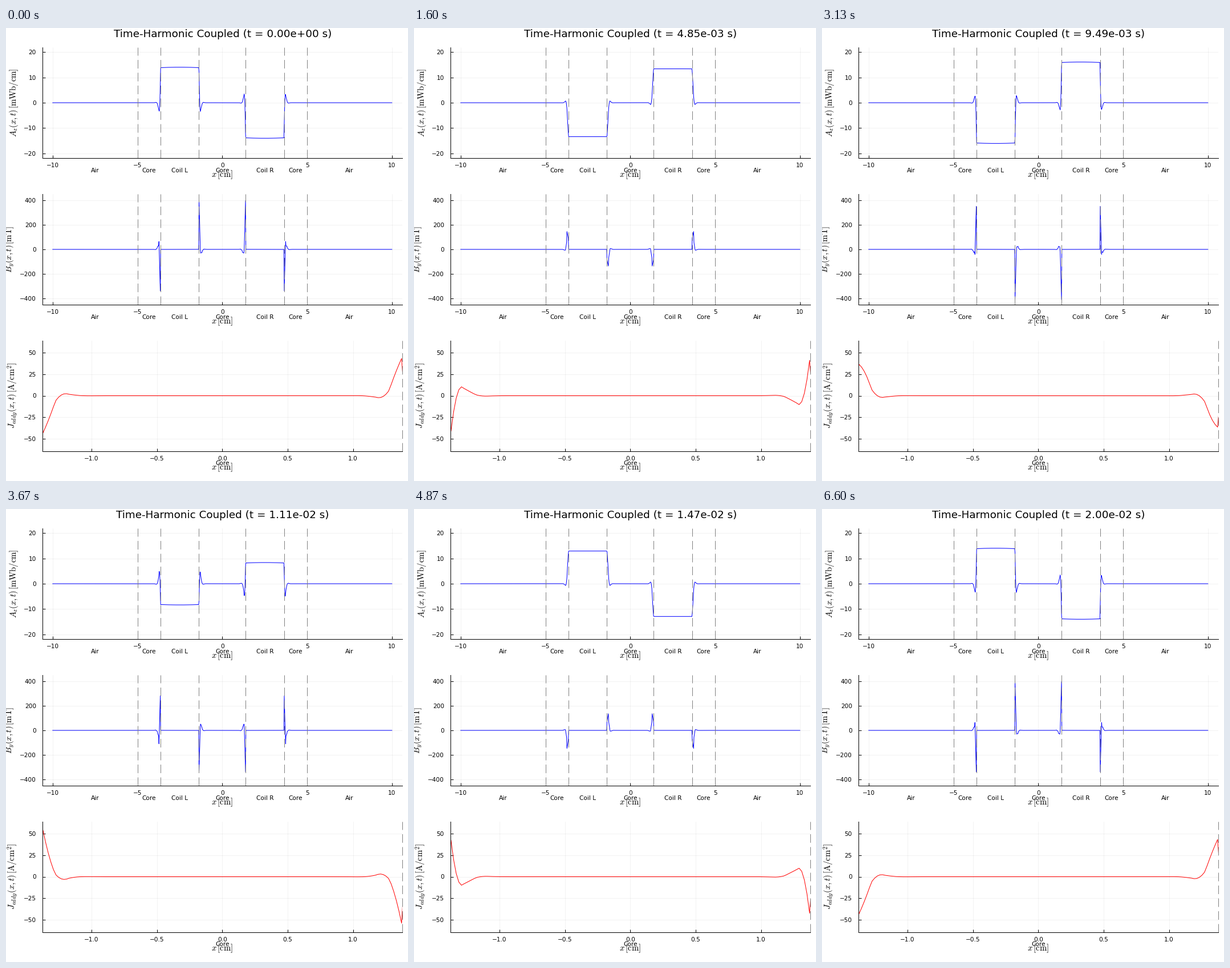
A matplotlib script for the animation above (6670 ms loop, 705 px wide and 794 px high).

```python
import numpy as np
import matplotlib.pyplot as plt
from matplotlib.animation import FuncAnimation

W, H, DPI = 705, 794, 100
PT = 72 / DPI  # points per pixel
TICKS, TICK_MS = 230, 29     # redraws per loop and their spacing
STEPS, T_END, FREQ = 100, 0.02, 50
LEFT, RIGHT = 64, 694.6
SMALL, MATH, TITLE = 10.5, 14.67, 18.4

plt.rcParams.update({"font.family": "DejaVu Sans", "mathtext.fontset": "cm"})

# Geometry in cm: core | coil | core | coil | core
X_IN, X_OUT, X_CORE = 1.375, 3.638, 5.0
A_EDGE = 13.9 + 14.1j        # vector potential phasor at the coil edges
BUMP = 0.17 + 0.02j          # rise of the potential inside a coil
DEPTH = 0.0581               # skin depth of the core
SIGMA_W = 1e7 * 2 * np.pi * FREQ * 1e-9


def solve_core(x0, x1, a0, a1, n):
    """Quadratic finite elements for A'' = k2 A with fixed end values."""
    h, k2 = (x1 - x0) / n, -2j / DEPTH**2
    stiff = np.array([[7, -8, 1], [-8, 16, -8], [1, -8, 7]]) / (3 * h)
    mass = np.array([[4, 2, -1], [2, 16, 2], [-1, 2, 4]]) * h / 30
    m = np.zeros((2 * n + 1, 2 * n + 1), complex)
    for e in range(n):
        s = slice(2 * e, 2 * e + 3)
        m[s, s] += stiff + k2 * mass
    rhs = np.zeros(2 * n + 1, complex)
    for i, a in ((0, a0), (-1, a1)):
        m[i] = 0
        m[i, i] = 1
        rhs[i] = a
    return np.linalg.solve(m, rhs)


def sample_core(x, x0, x1, nodes):
    """Potential and its negative slope at the points x."""
    n = len(nodes) // 2
    h = (x1 - x0) / n
    e = np.clip(((x - x0) / h).astype(int), 0, n - 1)
    s = (x - x0) / h - e
    p, q, r = nodes[2 * e], nodes[2 * e + 1], nodes[2 * e + 2]
    a = p * (1 - s) * (1 - 2 * s) + 4 * q * s * (1 - s) + r * s * (2 * s - 1)
    da = (p * (4 * s - 3) + q * (4 - 8 * s) + r * (4 * s - 1)) / h
    return a, -da


x = np.linspace(-10, 10, 1000)
A, B, J = (np.zeros(x.size, complex) for _ in range(3))

for x0, x1, a0, a1, n in ((-X_CORE, -X_OUT, 0, A_EDGE, 14),
                          (-X_IN, X_IN, A_EDGE, -A_EDGE, 28),
                          (X_OUT, X_CORE, -A_EDGE, 0, 14)):
    inside = (x >= x0) & (x <= x1)
    nodes = solve_core(x0, x1, a0, a1, n)
    A[inside], B[inside] = sample_core(x[inside], x0, x1, nodes)
    J[inside] = 1j * SIGMA_W * A[inside]

half, mid = (X_OUT - X_IN) / 2, (X_OUT + X_IN) / 2
for sign in (-1, 1):
    u = (x - sign * mid) / half
    inside = abs(u) < 1
    A[inside] = -sign * (A_EDGE + BUMP * (1 - u[inside]**2))
    B[inside] = -sign * 2 * BUMP * u[inside] / half

fig = plt.figure(figsize=(W / DPI, H / DPI), dpi=DPI, facecolor="white")


def label(px, py, s, size=SMALL, **kw):
    return fig.text(px / W, 1 - py / H, s, fontsize=size * PT, **kw)


def panel(top, xmax, ymax, xticks, yticks, xfmt, ylab, ylab_x, regions, color):
    bottom = top + 194
    ax = fig.add_axes([LEFT / W, 1 - bottom / H, (RIGHT - LEFT) / W, 194 / H])
    ax.set(xlim=(-xmax, xmax), ylim=(-ymax, ymax), xticks=xticks, yticks=yticks)
    ax.patch.set_visible(False)
    ax.spines[["top", "right"]].set_visible(False)
    for side in ("left", "bottom"):
        ax.spines[side].set_linewidth(PT)
    ax.tick_params(direction="in", length=5 * PT, width=PT,
                   labelleft=False, labelbottom=False)
    ax.set_axisbelow(True)
    ax.grid(color="black", alpha=0.1, lw=0.5 * PT)

    to_px = lambda v: LEFT + (v + xmax) / (2 * xmax) * (RIGHT - LEFT)
    for v in xticks:
        label(to_px(v), bottom + 16, format(v, xfmt).replace("-", "\u2212"),
              ha="center")
    for v in yticks:
        py = top + 97 * (1 - v / ymax)
        label(53, py + 4, str(v).replace("-", "\u2212"), ha="right")
    for v, name in regions:
        label(to_px(v), bottom + 25, name, ha="center")
    label(379.3, bottom + 29, r"$x\,\mathrm{[cm]}$", MATH,
          ha="center", va="center")
    label(ylab_x, top + 97, ylab, MATH, ha="center", va="center", rotation=90)

    curve, = ax.plot([], [], color=color, lw=PT, zorder=2.2)
    for v in (X_IN, X_OUT + 0.012, X_CORE):
        if v <= xmax:
            for sign in (-1, 1):
                ax.axvline(sign * v, color="gray", lw=PT, zorder=2.4,
                           dashes=(15, 7.5), clip_on=False)
    return curve


core_mid = (X_OUT + X_CORE) / 2
regions = [(-7.5, "Air"), (-core_mid, "Core"), (-mid, "Coil L"), (0, "Core"),
           (mid, "Coil R"), (core_mid, "Core"), (7.5, "Air")]
wide = range(-10, 11, 5)

curves = [
    panel(34, 10.6, 21.92, wide, range(-20, 21, 10), "d",
          r"$A_z(x,t)\,\mathrm{[mWb/cm]}$", 14, regions, "blue"),
    panel(291, 10.6, 452.5, wide, range(-400, 401, 200), "d",
          r"$B_y(x,t)\,\mathrm{[mT]}$", 7, regions, "blue"),
    panel(547.5, X_IN, 64.1, np.arange(-1, 1.1, 0.5), range(-50, 51, 25), ".1f",
          r"$J_{eddy}(x,t)\,\mathrm{[A/cm^2]}$", 12, [(0, "Core")], "red"),
]
title = label(379.7, 16.5, "", TITLE, ha="center")


def step_at(ms):
    """Steps last 70, 60 and 70 ms in turn: 15 per second on a 10 ms clock."""
    return (3 * (ms // 10) + 1) // 20


def update(tick):
    step = step_at((tick + 1) * TICK_MS - 1)
    t = T_END * step / (STEPS - 1)
    turn = np.exp(2j * np.pi * FREQ * t)
    for curve, phasor in zip(curves, (A, B, J)):
        curve.set_data(x, (phasor * turn).real)
    title.set_text(f"Time-Harmonic Coupled (t = {t:.2e} s)")
    return [*curves, title]


anim = FuncAnimation(fig, update, frames=TICKS, interval=TICK_MS,
                     init_func=lambda: update(0), repeat=True, repeat_delay=0)
plt.show()
```
